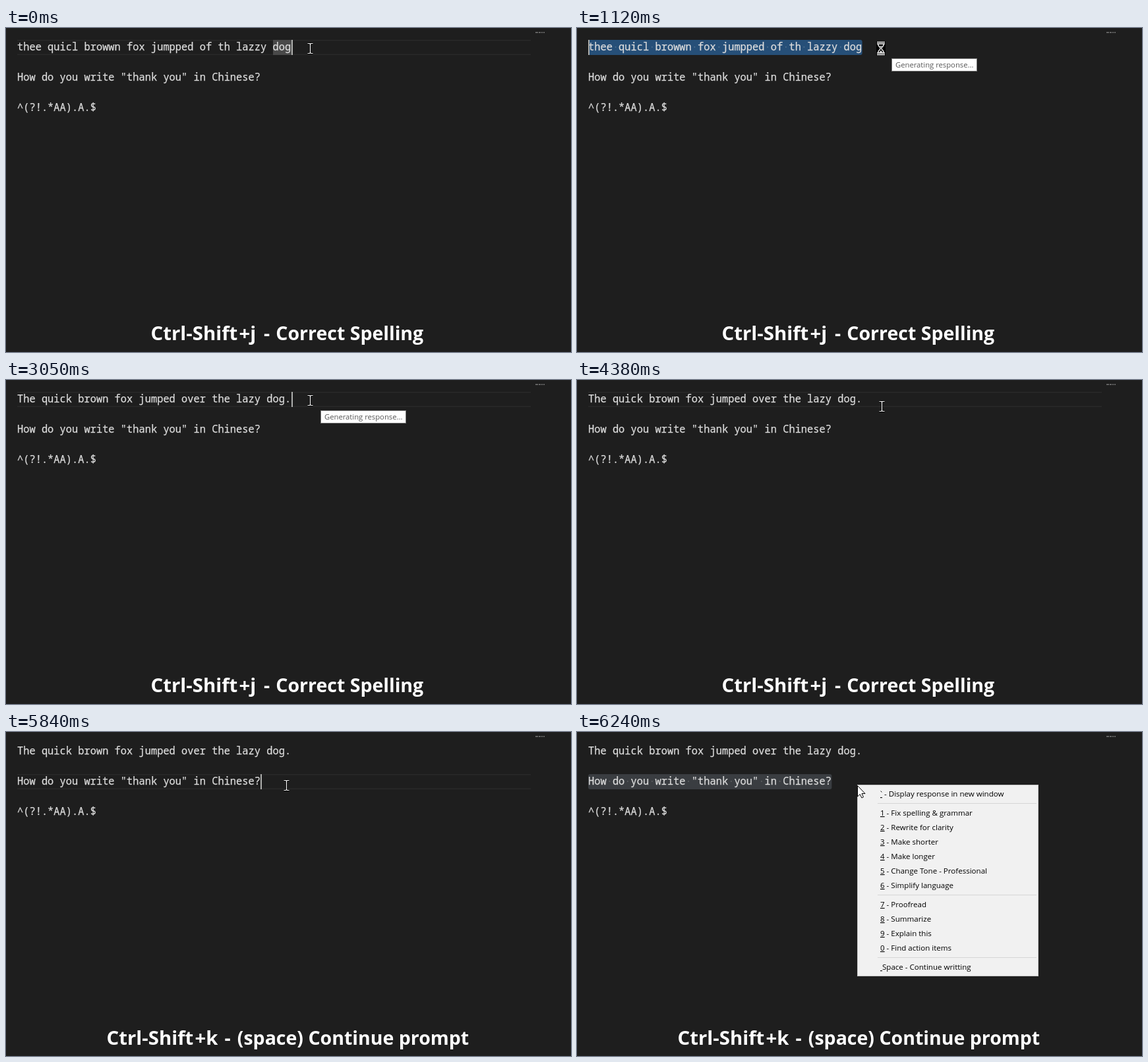
An HTML page that plays this animation: 857 px wide and 492 px high, repeating every 8 s.

```html
<!DOCTYPE html>
<html lang="en">
<head>
<meta charset="utf-8">
<title>Editor shortcuts</title>
<style>
  html, body { margin: 0; width: 100%; height: 100%; overflow: hidden; background: #1e1e1e; }
  svg { display: block; }
  text { white-space: pre; }
  .code { font: 15.39px "Noto Sans Mono", "DejaVu Sans Mono", monospace; fill: #dcdcdc; stroke: #dcdcdc; stroke-width: .25px; }
  .dots { fill: #e3e4e2; fill-opacity: .2; stroke: none; }
  .caption { font: bold 28.5px "Open Sans", "Noto Sans", sans-serif; fill: #fff; }
  .shortcut { font-size: 29.4px; }
  .menu { font: 11.55px "Open Sans", "Noto Sans", sans-serif; fill: #000; }
  .tip { font: 11.25px "Open Sans", "Noto Sans", sans-serif; fill: #575757; }
  .key { text-decoration: underline; }
</style>
</head>
<body>
<svg id="stage" width="857" height="492" viewBox="0 0 857 492">
  <rect width="857" height="492" fill="#1e1e1e"/>
  <path d="M803 6.8h4m1 0h3m1 0h2m1 0h2" stroke="#777" stroke-width="1.4"/>
  <path id="lineMark" d="M17 18.8H796M17 40.2H796" stroke="#292929" stroke-width="1.6"/>
  <rect id="wordMark" x="405" y="18" width="28" height="23" fill="#494949"/>
  <rect id="selection" x="17" height="23" rx="3"/>
  <text id="dots" class="code dots" x="17"/>
  <text id="first" class="code" x="17" y="34"/>
  <text class="code" x="17" y="80">How do you write "thank you" in Chinese?</text>
  <text class="code" x="17" y="126">^(?!.*AA).A.$</text>
  <rect id="caret" width="2" height="23" fill="#aeafad"/>
  <g id="tip">
    <rect x="477.5" y="46.5" width="129" height="19" fill="#fff" stroke="#767676"/>
    <text class="tip" x="483" y="60">Generating response...</text>
  </g>
  <text id="spellCaption" class="caption" y="474"><tspan class="shortcut" x="219.5">Ctrl-Shift</tspan><tspan class="shortcut" x="353.5">+j</tspan><tspan x="391">-</tspan><tspan x="409.3">Correct Spelling</tspan></text>
  <text id="promptCaption" class="caption" y="475"><tspan class="shortcut" x="152.5">Ctrl-Shift</tspan><tspan class="shortcut" x="286.5">+k</tspan><tspan x="331.5">-</tspan><tspan x="350.8">(space) Continue prompt</tspan></text>
  <g id="menu">
    <rect x="425.5" y="80.5" width="274" height="290" fill="#f1f1f1" stroke="#c4c4c4"/>
    <path d="M456 108.5H697M456 247.5H697M456 342.5H697" stroke="#d6d6d6"/>
    <path d="M460.7 89.6l1.6 1.8" stroke="#000"/>
  </g>
  <g id="ibeam" fill="none">
    <path d="M-4-7.5h3l1 1 1-1h3M0-6.5v13M-4 7.5h3l1-1 1 1h3" stroke="#000" stroke-width="3"/>
    <path d="M-4-7.5h3l1 1 1-1h3M0-6.5v13M-4 7.5h3l1-1 1 1h3" stroke="#fff" stroke-width="1.2"/>
  </g>
  <g id="hourglass" transform="translate(461 31)" fill="none">
    <rect x="-7" y="-11" width="14" height="22" fill="#000"/>
    <path d="M-6-9.5H6M-6-7H6M-6 7H6M-6 9.5H6" stroke="#fff" stroke-width="1.3"/>
    <path d="M-4-7v2.5L-1-.8v1.6L-4 4.5V7M4-7v2.5L1-.8v1.6L4 4.5V7" stroke="#fff" stroke-width="1.3"/>
    <path d="M-2-3.5h4L0-1zM-3 6.5L0 3l3 3.5z" fill="#ddd"/>
  </g>
  <path id="arrow" transform="translate(425.5 81.5)" d="M0 0V16.5L3.8 13 6.4 18.5 9 17.3 6.5 12H11.5Z"
    fill="#fff" stroke="#000"/>
</svg>
<script>
const LOOP = 8000;
const CHAR = 9.236;
const LEFT = 17;
const MISSPELT = 'thee quicl browwn fox jumpped of th lazzy dog';
const CORRECTED = 'The quick brown fox jumped over the lazy dog.';
const QUESTION = 'How do you write "thank you" in Chinese?';

const MENU = [
  [94, ' ', ' - Display response in new window'],
  [123, '1', ' - Fix spelling & grammar'],
  [145, '2', ' - Rewrite for clarity'],
  [167, '3', ' - Make shorter'],
  [189, '4', ' - Make longer'],
  [211, '5', ' - Change Tone - Professional'],
  [233, '6', ' - Simplify language'],
  [262, '7', ' - Proofread'],
  [284, '8', ' - Summarize'],
  [306, '9', ' - Explain this'],
  [328, '0', ' - Find action items'],
  [357, ' ', 'Space - Continue writting']
];

// Times at which the caret flips; it starts visible.
const BLINKS = [260, 790, 1520, 1980, 2520, 2590, 3130, 3590, 4050, 4840, 5310, 5840];

// Pointer positions, held from each time on: [time, x, y].
const POINTER = [
  [0, 461.5, 31], [4380, 462.5, 40], [4470, 458.5, 51], [4560, 448.5, 63],
  [4650, 436.5, 73], [4740, 427.5, 79], [4820, 425.5, 81]
];

const el = {};
document.querySelectorAll('[id]').forEach(node => el[node.id] = node);

const show = (node, on) => node.setAttribute('visibility', on ? 'visible' : 'hidden');
const set = (node, attrs) => {
  for (const name in attrs) node.setAttribute(name, attrs[name]);
};
const setText = (node, value) => {
  if (node.textContent !== value) node.textContent = value;
};

function svgNode(tag, attrs, parent, content = '') {
  const node = document.createElementNS('http://www.w3.org/2000/svg', tag);
  set(node, attrs);
  node.textContent = content;
  return parent.appendChild(node);
}

function buildMenu() {
  for (const [y, key, label] of MENU) {
    const row = svgNode('text', { class: 'menu', x: 460, y: y + 4 }, el.menu);
    svgNode('tspan', { class: 'key' }, row, key);
    svgNode('tspan', {}, row, label);
  }
}

function draw(t) {
  const within = (from, to) => t >= from && t < to;
  const selected = within(990, 2590) || t >= 6170;
  const menuOpen = t >= 6240;
  const onSecond = t >= 4840;
  const rowTop = onSecond ? 64 : 18;
  const firstText = t < 2590 ? MISSPELT : CORRECTED;
  const line = onSecond ? QUESTION : firstText;
  const lineWidth = line.length * CHAR;

  setText(el.first, firstText);

  show(el.lineMark, !selected);
  set(el.lineMark, { transform: `translate(0 ${rowTop - 18})` });
  show(el.wordMark, t < 990);

  show(el.selection, selected);
  show(el.dots, selected);
  set(el.selection, { y: rowTop, width: lineWidth, fill: menuOpen ? '#3a3d41' : '#264f78' });
  set(el.dots, { y: rowTop + 16 });
  setText(el.dots, line.replace(/[^ ]/g, '\u00a0').replace(/ /g, '·'));

  const caretOn = BLINKS.filter(time => time <= t).length % 2 === 0;
  show(el.caret, caretOn && !menuOpen);
  set(el.caret, { x: selected ? LEFT : Math.round(LEFT + lineWidth), y: rowTop });

  const waiting = within(1060, 2520);
  show(el.tip, within(1120, 3130));
  show(el.hourglass, waiting);
  show(el.ibeam, !waiting && !menuOpen);
  const [, x, y] = POINTER.filter(p => p[0] <= t).pop();
  set(el.ibeam, { transform: `translate(${x} ${y})` });

  show(el.spellCaption, t < 4650);
  show(el.promptCaption, t >= 5310);
  show(el.menu, menuOpen);
  show(el.arrow, menuOpen);
}

buildMenu();
const start = performance.now();
function tick() {
  draw((performance.now() - start) % LOOP);
  requestAnimationFrame(tick);
}
draw(0);
requestAnimationFrame(tick);
</script>
</body>
</html>
```
